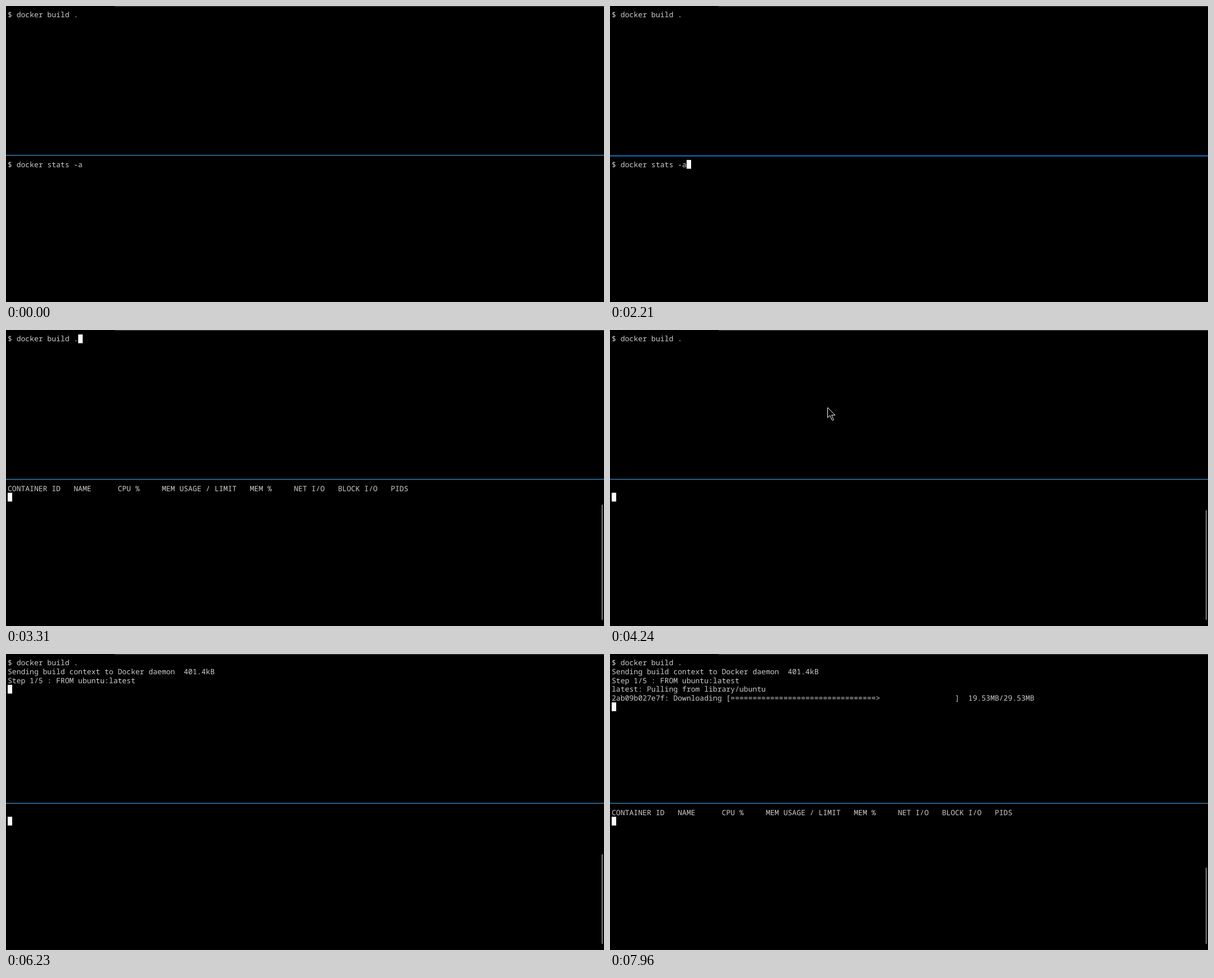
Recreate the animation shown at these times as an HTML page. Size 1062x527 px, loop 8 s.

```html
<!DOCTYPE html>
<html lang="en">
<head>
<meta charset="utf-8">
<title>Docker build and stats</title>
<style>
  html, body { margin: 0; width: 100%; height: 100%; overflow: hidden; background: #000; }
  svg { display: block; width: 100vw; height: 100vh; }
  text {
    font: 13.04px "Noto Sans Mono", "DejaVu Sans Mono", monospace;
    font-variant-ligatures: none;
    text-rendering: geometricPrecision;
    white-space: pre;
    fill: #ccc;
  }
</style>
</head>
<body>
<svg id="stage" viewBox="0 0 1062 527" preserveAspectRatio="none">
  <defs>
    <path id="arrow" d="M.5 .5V18.5L4.6 14.6L8.4 23Q9.6 24.2 11.2 22.4L7.6 14H13.8Z"/>
    <clipPath id="lower"><rect x="320" y="147" width="24" height="18"/></clipPath>
  </defs>
  <rect width="1062" height="527"/>
  <rect x="193" width="869" height="1.5" fill="#333"/>
  <g id="thin">
    <rect y="265" width="1062" height="1" fill="#3079a9"/>
    <rect y="266" width="1062" height="1" fill="#173f5e"/>
  </g>
  <g id="thick">
    <rect y="265" width="1062" height="1" fill="#0a2b47"/>
    <rect y="266" width="1062" height="2" fill="#0e61a6"/>
  </g>
  <use id="ghost" href="#arrow" x="325" y="138" fill="none" stroke="#15160c" clip-path="url(#lower)"/>
  <g id="lines"></g>
  <rect id="topCaret" width="8" height="15.6" fill="#fff"/>
  <rect id="lowCaret" width="8" height="15.6" fill="#fff"/>
  <rect id="bar" x="1058" width="1.5" fill="#a8a8a8"/>
  <use id="pointer" href="#arrow" fill="#000" stroke="#fff"/>
</svg>
<script>
const LOOP = 8000, CELL = 7.826, ROW = 15.65, LEFT = 3, TOP = 8, LOW = 274.1;
const $ = id => document.getElementById(id);
const show = (el, on) => el.setAttribute('visibility', on ? 'visible' : 'hidden');
const move = (el, x, y) => { el.setAttribute('x', x); el.setAttribute('y', y); };
const within = (t, a, b) => t >= a && t < b;

// Value of the latest [time, value] entry that has begun.
const latest = (steps, t) => steps.reduce((v, s) => t >= s[0] ? s[1] : v, null);

function addLine(pane, row) {
  const el = document.createElementNS('http://www.w3.org/2000/svg', 'text');
  move(el, LEFT, pane + row * ROW + 12.4);
  $('lines').append(el);
  return el;
}
function write(el, str) {
  if (el.textContent !== str) el.textContent = str;
}

const topLines = [0, 1, 2, 3, 4].map(r => addLine(TOP, r));
const lowLine = addLine(LOW, 0);

const HEADER = 'CONTAINER ID   NAME      CPU %     MEM USAGE / LIMIT   MEM %     NET I/O   BLOCK I/O   PIDS';
const BUILD = [
  [0, '$ docker build .'],
  [4840, 'Sending build context to Docker daemon  401.4kB'],
  [4840, 'Step 1/5 : FROM ubuntu:latest'],
  [6630, 'latest: Pulling from library/ubuntu']
];
const LOADED = [[7570, .3104], [7640, 3.714], [7760, 7.987], [7910, 14.06], [7960, 19.53]];

function layerText(t) {
  if (t < 7030) return '';
  const mb = latest(LOADED, t);
  if (mb === null) return '2ab09b027e7f: Pulling fs layer';
  const n = Math.floor(mb / 29.53 * 50);
  const size = mb < 1 ? (mb * 1000).toPrecision(4) + 'kB' : mb.toPrecision(4) + 'MB';
  return `2ab09b027e7f: Downloading [${'='.repeat(n)}>${' '.repeat(50 - n)}]  ${size}/29.53MB`;
}

// Stats redraws: the header blanks for a moment, then the scroll thumb shrinks.
const REDRAWS = [3240, 3770, 4240, 4770, 5310, 5770, 6230, 7230];
const THUMB = [[2740, 297], [3310, 311], [3840, 321], [4310, 332], [4840, 341], [5380, 349],
  [5840, 356.5], [6300, 363], [6770, 369.5], [7300, 376], [7760, 380.5]];

// Caret cells as [column, row]; null while blinked off.
const TOP_CARET = [[3020, [16, 0]], [3510, null], [3770, [0, 1]], [4240, null], [4770, [0, 1]],
  [4840, [0, 3]], [5310, null], [5840, [0, 3]], [6400, null], [6630, [0, 4]], [7030, [0, 5]]];
const LOW_CARET = [[1150, [17, 0]], [1680, null], [2210, [17, 0]], [2350, [0, 1]],
  [2740, null], [3240, [0, 1]]];

function placeCaret(el, steps, pane, t) {
  const cell = latest(steps, t);
  show(el, cell);
  if (cell) move(el, LEFT + cell[0] * CELL, pane + cell[1] * ROW);
}

function pointerAt(t) {
  const step = (a, b) => Math.min(1, Math.floor((t - a) / 68) * 68 / (b - a));
  if (within(t, 460, 1150)) {
    const k = Math.sin(Math.PI * step(460, 1150));
    return [450 - 30 * k, 484 - 84 * k];
  }
  if (within(t, 2280, 3020)) {
    const p = step(2280, 2820), k = p * p * (3 - 2 * p);
    return [430 - 105 * k, 450 - 312 * k];
  }
  return within(t, 3580, 4840) ? [386, 137.5] : null;
}

function draw(t) {
  BUILD.forEach(([at, str], i) => write(topLines[i], t >= at ? str : ''));
  write(topLines[4], layerText(t));

  const blank = REDRAWS.some(at => within(t, at, at + 70));
  write(lowLine, t < 2670 ? '$ docker stats -a' : t < 2740 || blank ? '' : HEADER);

  placeCaret($('topCaret'), TOP_CARET, TOP - .1, t);
  placeCaret($('lowCaret'), LOW_CARET, LOW, t);

  const thumb = latest(THUMB, t);
  show($('bar'), thumb);
  if (thumb) {
    $('bar').setAttribute('y', thumb);
    $('bar').setAttribute('height', 516 - thumb);
  }

  const lowFocus = within(t, 600, 2950);
  show($('thick'), lowFocus);
  show($('thin'), !lowFocus);

  const p = pointerAt(t);
  show($('pointer'), p);
  if (p) move($('pointer'), ...p);
  show($('ghost'), t >= 3020);
}

const start = performance.now();
function tick() {
  draw((performance.now() - start) % LOOP);
  requestAnimationFrame(tick);
}
tick();
</script>
</body>
</html>
```
